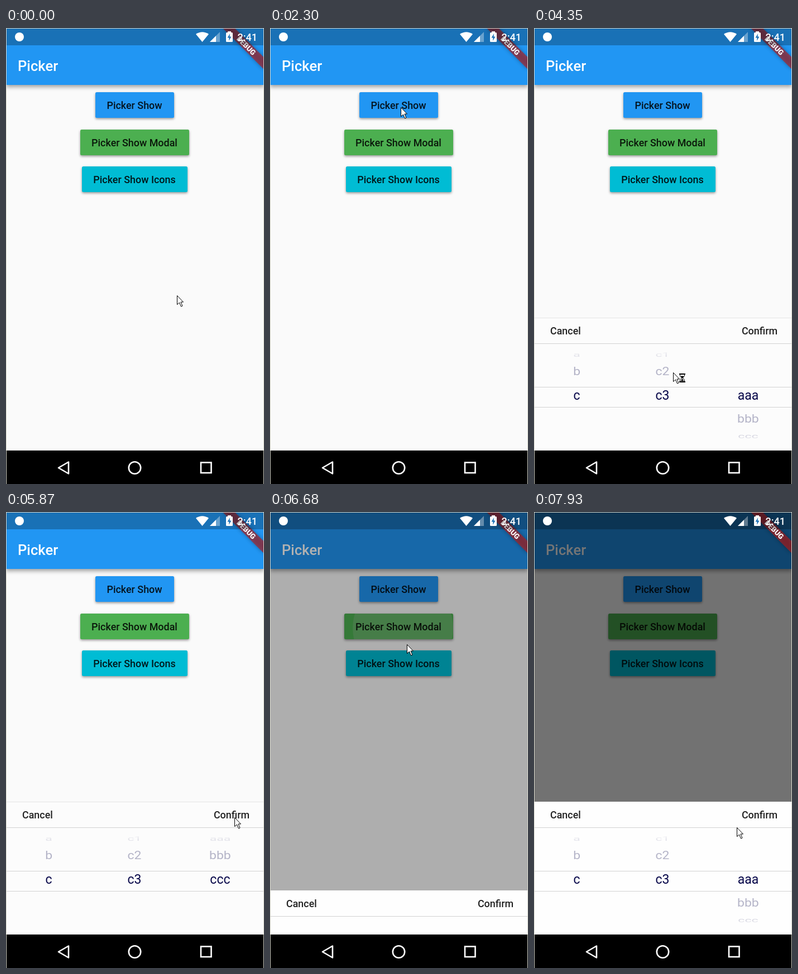
An HTML page with a canvas for the animation above (8000 ms loop, 462 by 817 pixels).

```html
<!DOCTYPE html>
<html lang="en">
<head>
<meta charset="utf-8">
<title>Picker</title>
<style>
  html, body { margin: 0; width: 462px; height: 817px; overflow: hidden; background: #fafafa; }
  canvas { display: block; }
</style>
</head>
<body>
<canvas id="stage" width="462" height="817"></canvas>
<script>
const ctx = document.getElementById('stage').getContext('2d');
const LOOP = 8000, TICK = 88;
const WIDTH = 462, HEIGHT = 817, BOTTOM = 757, SHEET = 238, ROW = 139;
const SPIN = 260;

const buttons = [
  { label: 'Picker Show', width: 141, color: '#2196f3' },
  { label: 'Picker Show Modal', width: 195, color: '#4caf50' },
  { label: 'Picker Show Icons', width: 189, color: '#00bcd4' }
];
const letters = ['a', 'b', 'c'];

// Each session presses a button, then drags the columns one after another.
const sessions = [
  { start: 2580, button: 0, press: { x: 234, y: 142 }, drags: [3210, 4080, 4970], close: 5950 },
  { start: 6590, button: 1, press: { x: 238, y: 208 }, drags: [7040, 7570], close: Infinity, modal: true }
];
// The screen refreshes once per TICK, counted from the start of each scene.
const scenes = [0, 1300, sessions[0].start, 5870, sessions[1].start];

const clamp = u => Math.max(0, Math.min(1, u));
const smooth = u => (u = clamp(u)) * u * (3 - 2 * u);
const easeOut = u => 1 - (1 - clamp(u)) ** 2;
const columnX = i => 76.6 + 153.4 * i;

const stop = (time, x, y) => ({ time, x, y });
const dragStops = session => session.drags.flatMap((time, i) => [
  stop(time, columnX(i) + 19, 705),
  stop(time + SPIN, columnX(i) + 19, 617)
]);
const cursorPath = [
  stop(0, 306, 479), stop(TICK, 351, 553),
  stop(1300, 434, 485), stop(1470, 273, 426), stop(1740, 270, 426),
  stop(2270, 234, 142), stop(2850, 234, 142),
  ...dragStops(sessions[0]),
  stop(5590, 409, 547), stop(5950, 409, 547),
  stop(6400, 238, 208), stop(6590, 238, 208), stop(6590 + TICK, 245, 237), stop(6590 + 2 * TICK, 259, 351),
  ...dragStops(sessions[1]),
  stop(7910, 363, 565)
];

function cursorAt(t) {
  const next = cursorPath.findIndex(s => s.time > t);
  if (next < 0) return cursorPath.at(-1);
  const a = cursorPath[next - 1], b = cursorPath[next];
  const u = smooth((t - a.time) / (b.time - a.time));
  return { x: a.x + (b.x - a.x) * u, y: a.y + (b.y - a.y) * u };
}

function screenTime(t) {
  const scene = scenes.filter(s => s <= t).pop();
  return scene + TICK * Math.floor((t - scene) / TICK);
}

function rect(x, y, w, h, color) {
  ctx.fillStyle = color;
  ctx.fillRect(x, y, w, h);
}

function circle(x, y, r, color) {
  ctx.beginPath();
  ctx.arc(x, y, r, 0, 7);
  ctx.fillStyle = color;
  ctx.fill();
}

function text(label, x, y, size, color, align = 'left', weight = 500) {
  ctx.font = `${weight} ${size}px Roboto, sans-serif`;
  ctx.textAlign = align;
  ctx.fillStyle = color;
  ctx.fillText(label, x, y);
}

function poly(points, fill, stroke, width = 1) {
  ctx.beginPath();
  points.forEach(([x, y]) => ctx.lineTo(x, y));
  ctx.closePath();
  if (fill) { ctx.fillStyle = fill; ctx.fill(); }
  if (stroke) { ctx.strokeStyle = stroke; ctx.lineWidth = width; ctx.stroke(); }
}

function shadow(color, blur, dy) {
  ctx.shadowColor = color;
  ctx.shadowBlur = blur;
  ctx.shadowOffsetY = dy;
}

function drawButton(button, index, session, age) {
  const x = Math.floor(230.8 - button.width / 2), y = Math.round(115 + 66.7 * index);
  ctx.save();
  ctx.beginPath();
  ctx.roundRect(x, y, button.width, 46, 2.5);
  ctx.fillStyle = button.color;
  shadow('rgba(0,0,0,.4)', 4, 2);
  ctx.fill();
  shadow('transparent', 0, 0);
  ctx.clip();
  if (index === session.button && age >= 0 && age < 150) {
    circle(session.press.x, session.press.y, 30 + .68 * age, 'rgba(200,200,200,.2)');
  }
  ctx.restore();
  text(button.label, 230, y + 29.7, 17.9, 'rgba(0,0,0,.87)', 'center');
}

function drawPage(session, age) {
  rect(0, 0, WIDTH, HEIGHT, '#fafafa');
  ctx.save();
  shadow('rgba(0,0,0,.35)', 7, 4);
  rect(0, 0, WIDTH, 102, '#2196f3');
  ctx.restore();
  text('Picker', 21, 77, 25.6, '#fff');
  buttons.forEach((button, i) => drawButton(button, i, session, age));
  if (session.modal) rect(0, 0, WIDTH, BOTTOM, `rgba(0,0,0,${.54 * easeOut((age - 29) / 173)})`);
}

function drawWheel(items, position, x, centerY) {
  const radius = 84, angle = .53;
  items.forEach((item, i) => {
    const theta = (i - position) * angle;
    if (Math.abs(theta) > 1.4) return;
    ctx.save();
    ctx.translate(x, centerY + radius * Math.sin(theta));
    ctx.scale(1, Math.cos(theta));
    text(item, 0, 8, 23, '#08084a', 'center', 400);
    ctx.restore();
  });
}

// Veils everything outside the selected row, stronger towards the rim.
function veil(rim, row, paper) {
  const g = ctx.createLinearGradient(0, rim, 0, row);
  g.addColorStop(.13, paper);
  g.addColorStop(.53, paper + 'b3');
  g.addColorStop(1, paper + 'b3');
  rect(0, Math.min(rim, row), WIDTH, Math.abs(rim - row), g);
}

function drawSheet(t, session, age) {
  const rise = easeOut((age - 48.5) / 216) - clamp((t - session.close) / SPIN) ** 2;
  const y = Math.round(BOTTOM - SHEET * rise);
  if (y >= BOTTOM) return;
  const paper = session.modal ? '#fefefe' : '#fcfcfc';
  const [spin1, spin2, spin3] = [0, 1, 2].map(i => 2 * smooth((t - (session.drags[i] ?? LOOP)) / SPIN));
  const letter = spin1 < 1 ? 'a' : 'c';
  const branch = 1 + Math.round(spin2);
  const columns = [
    [letters, spin1],
    [[1, 2, 3].map(n => letter + n), spin2],
    [letter === 'a' ? [1, 2, 3, 4] : letters.map(l => l.repeat(branch)), spin3]
  ];

  ctx.save();
  ctx.beginPath();
  ctx.rect(0, y, WIDTH, BOTTOM - y);
  ctx.clip();
  rect(0, y, WIDTH, SHEET, paper);
  if (!session.modal) rect(0, y, WIDTH, 1, '#e6e6e6');
  columns.forEach(([items, position], i) => drawWheel(items, position, columnX(i), y + ROW));
  veil(y + 47, y + 124, paper);
  veil(y + SHEET, y + 161, paper);
  for (const line of [46, 124, 160]) rect(0, y + line, WIDTH, 1, '#d2d2d2');
  text('Cancel', 29, y + 30, 17.9, '#222');
  text('Confirm', 436, y + 30, 17.9, '#222', 'right');
  ctx.restore();
}

function drawBanner() {
  ctx.save();
  ctx.beginPath();
  ctx.rect(1, 1, 460, 756);
  ctx.clip();
  ctx.translate(461, 1);
  ctx.rotate(Math.PI / 4);
  ctx.save();
  shadow('rgba(0,0,0,.5)', 7, 0);
  rect(-51, 35.8, 102, 15.3, 'rgba(183,28,28,.63)');
  ctx.restore();
  text('DEBUG', 0, 48, 13, '#fff', 'center', 900);
  ctx.restore();
}

function drawStatusBar() {
  rect(0, 0, WIDTH, 31, 'rgba(0,0,0,.25)');
  circle(24, 16, 8, '#fff');

  ctx.beginPath();
  ctx.moveTo(351.5, 25);
  ctx.lineTo(340, 11);
  ctx.quadraticCurveTo(351.5, 3.5, 363, 11);
  ctx.fill();
  poly([[383, 7], [383, 25], [365, 25]], 'rgba(255,255,255,.35)');
  poly([[376, 14], [376, 25], [365, 25]], '#fff');

  rect(397, 6, 6, 3, '#fff');
  ctx.beginPath();
  ctx.roundRect(394, 8, 12, 17, 1.5);
  ctx.fill();
  poly([[401, 10], [396.5, 17.5], [399.5, 17.5], [399, 23], [403.5, 15.5], [400.5, 15.5]], '#1b70b6');
  text('2:41', 450, 22.5, 18, '#fff', 'right');
}

function drawNavBar() {
  rect(0, BOTTOM, WIDTH, HEIGHT - BOTTOM, '#000');
  ctx.lineJoin = 'round';
  poly([[94, 788], [112, 777.5], [112, 798.5]], null, '#fff', 2.6);
  ctx.beginPath();
  ctx.arc(230.5, 788, 10.7, 0, 7);
  ctx.stroke();
  ctx.lineJoin = 'miter';
  ctx.strokeRect(349, 778.5, 18.5, 18.5);
}

function drawHourglass() {
  poly([[12, 3], [20, 3], [20, 6], [17, 9.5], [20, 13], [20, 16], [12, 16], [12, 13], [15, 9.5], [12, 6]], '#fff', '#000');
  poly([[13, 6], [19, 6], [13, 15], [19, 15]], '#000');
  for (const y of [1.5, 15.5]) rect(10.5, y, 11, 2, '#000');
}

function drawCursor(t) {
  if (t >= 2 * TICK && t < 1300) return;
  const { x, y } = cursorAt(t);
  ctx.save();
  ctx.translate(Math.round(x) + .5, Math.round(y) + .5);
  poly([[0, 0], [0, 16], [4, 12.5], [7, 19.5], [9.5, 18.5], [6.5, 11.5], [11, 11.5]], '#fff', '#000');
  if (t > 4300 && t < 4420) drawHourglass();
  ctx.restore();
}

function drawFrame(now) {
  const t = screenTime(now % LOOP);
  const session = sessions[t < sessions[1].start ? 0 : 1];
  const age = t - session.start;
  drawPage(session, age);
  drawSheet(t, session, age);
  drawBanner();
  drawStatusBar();
  drawNavBar();
  ctx.strokeStyle = '#d4d4c8';
  ctx.lineWidth = 1;
  ctx.strokeRect(.5, .5, WIDTH - 1, HEIGHT);
  drawCursor(t);
}

let begin;
function tick(now) {
  begin ??= now;
  drawFrame(now - begin);
  requestAnimationFrame(tick);
}
requestAnimationFrame(tick);
</script>
</body>
</html>
```
